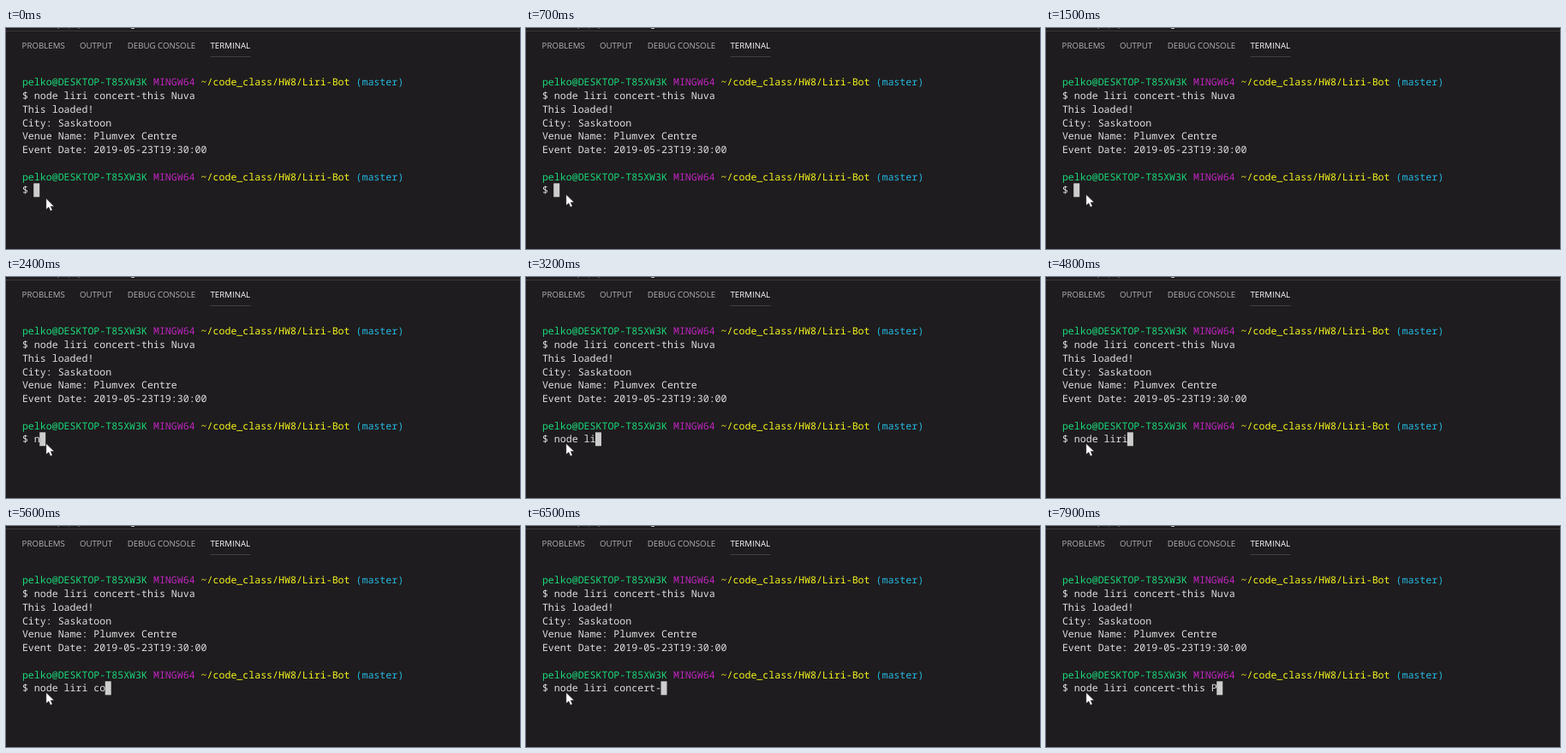
Write an HTML page that moves like this. It is 600 px wide and 258 px high and loops after 8 s.

```html
<!DOCTYPE html>
<html lang="en">
<head>
<meta charset="utf-8">
<title>Terminal</title>
<style>
  html, body { margin: 0; width: 100%; height: 100%; overflow: hidden; background: #1e1c1e; }
  svg { display: block; width: 600px; height: 258px; }
  text { white-space: pre; text-rendering: geometricPrecision; }
  .tabs { font: 9.7px "Open Sans", "Noto Sans", sans-serif; fill: #b2b1b2; }
  .tabs .active { fill: #fff; }
  .term { font: 11.6px "Noto Sans Mono", "DejaVu Sans Mono", monospace; fill: #dedede; }
  .user { fill: #1cd57a; }
  .sys { fill: #bd25bd; }
  .path { fill: #f4f41c; }
  .branch { fill: #25b6de; }
</style>
</head>
<body>
<svg viewBox="0 0 600 258">
  <rect width="600" height="258" fill="#1e1c1e"/>
  <rect y="3" width="600" height="1" fill="#3a393b"/>
  <rect x="146" width="4" height="1" fill="#b8b8b8"/>
  <path d="M60 .5h2M73 .5h1M84 .5h2" stroke="#59585a"/>
  <g class="tabs">
    <text x="18.6" y="24.1">PROBLEMS</text>
    <text x="85.9" y="24.1">OUTPUT</text>
    <text x="141.7" y="24.1">DEBUG CONSOLE</text>
    <text x="238.5" y="24.1" class="active">TERMINAL</text>
  </g>
  <rect x="238.5" y="33" width="47" height="1" fill="#403f41"/>
  <g class="term" id="term"></g>
  <rect id="caret" y="181.3" width="7" height="16" fill="#cdcdcd"/>
  <path id="mouse" d="M0 0V12.6L3 9.9L5 14.4L7.2 13.4L5.2 9.1H9.2Z" fill="#fff" stroke="#1a1a1a" stroke-width=".4"/>
</svg>
<script>
  const LOOP = 8000, LEFT = 18.9, CHAR = 6.96, TOP = 67.2, LINE = 15.78;
  const term = document.getElementById('term');
  const caret = document.getElementById('caret');
  const mouse = document.getElementById('mouse');

  const prompt = [
    ['user', 'pelko@DESKTOP-T85XW3K'],
    ['sys', ' MINGW64'],
    ['path', ' ~/code_class/HW8/Liri-Bot'],
    ['branch', ' (master)']
  ];
  const rows = [
    prompt,
    '$ node liri concert-this Nuva',
    'This loaded!',
    'City: Saskatoon',
    'Venue Name: Plumvex Centre',
    'Event Date: 2019-05-23T19:30:00',
    '',
    prompt,
    '$ '
  ];

  function make(tag, parent, attrs, content = '') {
    const el = document.createElementNS('http://www.w3.org/2000/svg', tag);
    for (const key in attrs) el.setAttribute(key, attrs[key]);
    el.textContent = content;
    return parent.appendChild(el);
  }

  const lines = rows.map((row, i) => {
    const line = make('text', term, { x: LEFT, y: TOP + LINE * i });
    if (typeof row === 'string') line.textContent = row;
    else row.forEach(([cls, part]) => make('tspan', line, { class: cls }, part));
    return line;
  });
  const input = lines[lines.length - 1];

  // One time in ms for each typed character
  const command = 'node liri concert-this P';
  const keys = [
    2300, 2500, 2600, 2700, 2800, 3000, 3100, 3300, 3500,
    5000, 5300, 5500, 5700, 5900, 6000, 6200, 6300, 6400,
    6700, 6800, 7000, 7100, 7400, 7800
  ];

  function draw(t) {
    const typed = keys.filter(k => k <= t).length;
    const content = '$ ' + command.slice(0, typed);
    if (input.textContent !== content) input.textContent = content;
    caret.setAttribute('x', LEFT + CHAR * content.length - 0.6);

    const p = Math.min(1, Math.max(0, (t - 100) / 400));
    const ease = p * p * (3 - 2 * p);
    mouse.setAttribute('transform', `translate(46.9 ${199.1 - 4.6 * ease})`);
  }

  const start = performance.now();
  function tick() {
    draw((performance.now() - start) % LOOP);
    requestAnimationFrame(tick);
  }
  tick();
</script>
</body>
</html>
```
